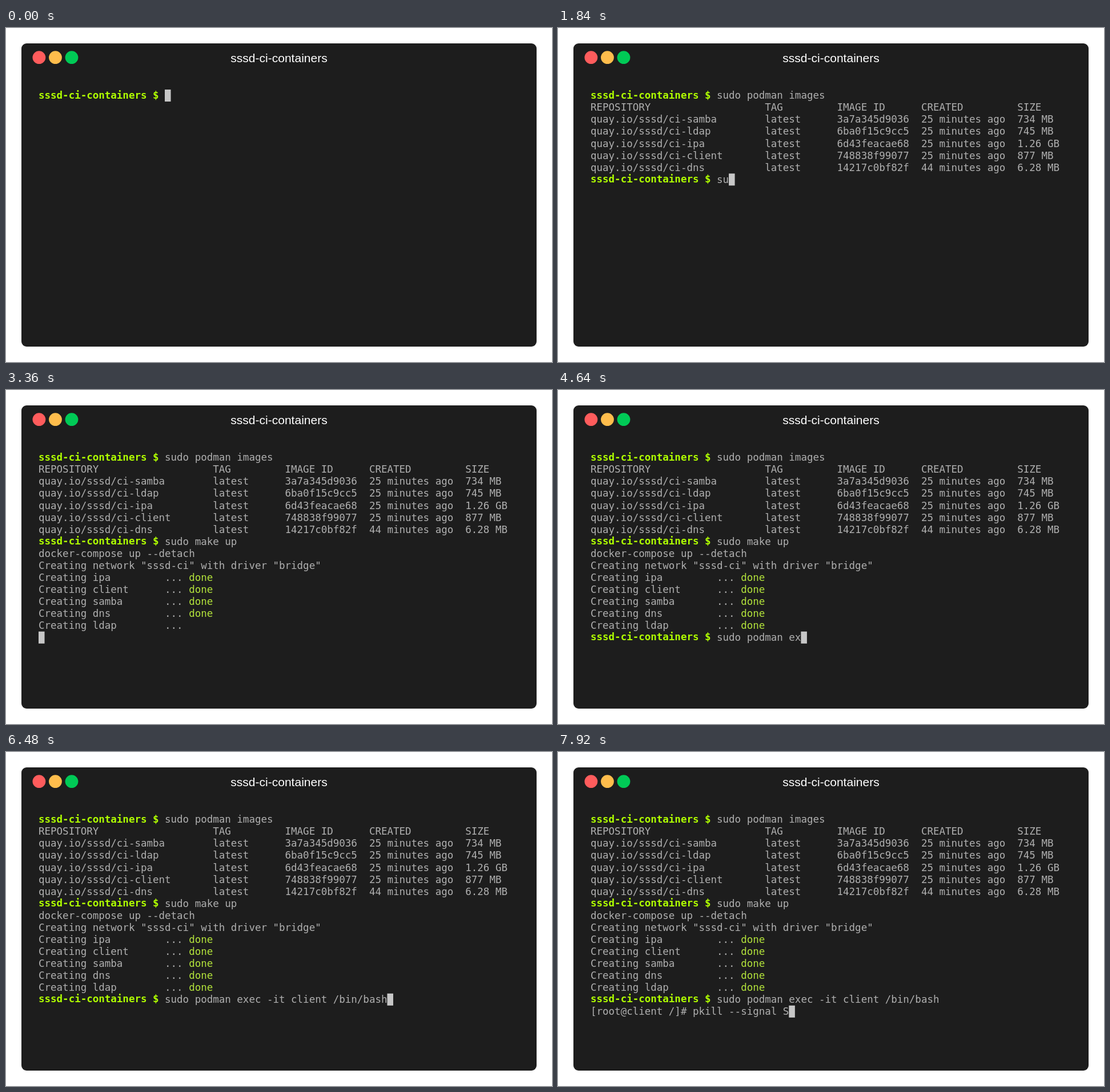
These frames come from a looping animation (956 px wide and 586 px high, 8 s). An HTML page with a canvas:

```html
<!DOCTYPE html>
<html lang="en">
<head>
<meta charset="utf-8">
<title>sssd-ci-containers</title>
<style>
  html, body { margin: 0; width: 100%; height: 100%; overflow: hidden; background: #fff; }
  canvas { display: block; width: 956px; height: 586px; }
</style>
</head>
<body>
<canvas id="stage"></canvas>
<script>
const W = 956, H = 586, LOOP = 8000, TICK = 80;
const CELL_W = 10.525, CELL_H = 21.05, LEFT = 57, TOP = 108;
const MONO = '17.54px "DejaVu Sans Mono", monospace';
const STYLES = {
  plain: { font: MONO, color: '#afafaf', base: 16.3 },
  done: { font: MONO, color: '#b3e33b', base: 16.3 },
  prompt: { font: 'bold ' + MONO, color: '#afff00', base: 15.5 }
};

const canvas = document.getElementById('stage');
const ctx = canvas.getContext('2d');
const dpr = window.devicePixelRatio || 1;
canvas.width = W * dpr;
canvas.height = H * dpr;
ctx.scale(dpr, dpr);

// Timeline entries: text appears at a tick, either at once or typed.
const events = [];
const put = (tick, row, col, text, style = 'plain') =>
  events.push({ tick, row, col, text, style });
const type = (tick, row, col, text) =>
  events.push({ tick, row, col, text, style: 'plain', typed: true });
const moveTo = (tick, row) => put(tick, row, 0, '');
const line = (tick, row, text) => { put(tick, row, 0, text); moveTo(tick, row + 1); };
const prompt = (tick, row) => {
  put(tick, row, 0, 'sssd-ci-containers $', 'prompt');
  put(tick, row, 20, ' ');
};
const tableRow = (repo, tag, id, created, size) =>
  repo.padEnd(29) + tag.padEnd(12) + id.padEnd(14) + created.padEnd(16) + size;

prompt(0, 0);
type(1, 0, 21, 'sudo podman images');
moveTo(19, 1);
[
  ['REPOSITORY', 'TAG', 'IMAGE ID', 'CREATED', 'SIZE'],
  ['quay.io/sssd/ci-samba', 'latest', '3a7a345d9036', '25 minutes ago', '734 MB'],
  ['quay.io/sssd/ci-ldap', 'latest', '6ba0f15c9cc5', '25 minutes ago', '745 MB'],
  ['quay.io/sssd/ci-ipa', 'latest', '6d43feacae68', '25 minutes ago', '1.26 GB'],
  ['quay.io/sssd/ci-client', 'latest', '748838f99077', '25 minutes ago', '877 MB'],
  ['quay.io/sssd/ci-dns', 'latest', '14217c0bf82f', '44 minutes ago', '6.28 MB']
].forEach((cells, i) => line(20, 1 + i, tableRow(...cells)));

prompt(21, 7);
type(22, 7, 21, 'sudo make up');
moveTo(34, 8);
line(35, 8, 'docker-compose up --detach');
line(36, 9, 'Creating network "sssd-ci" with driver "bridge"');
const services = ['ipa', 'client', 'samba', 'dns', 'ldap'];
services.forEach((name, i) =>
  line(i ? 38 : 37, 10 + i, ('Creating ' + name).padEnd(21) + '...'));
services.forEach((_, i) => {
  put(39 + i, 10 + i, 25, 'done', 'done');
  moveTo(39 + i, 15);
});

prompt(44, 15);
type(45, 15, 21, 'sudo podman exec -it client /bin/bash');
moveTo(82, 16);
put(83, 16, 0, '[root@client /]# ');
type(84, 16, 17, 'pkill --signal S');

function drawText(text, row, col, style) {
  const { font, color, base } = STYLES[style];
  ctx.font = font;
  ctx.fillStyle = color;
  ctx.textAlign = 'left';
  [...text].forEach((ch, i) => {
    if (ch !== ' ') ctx.fillText(ch, LEFT + (col + i) * CELL_W, TOP + row * CELL_H + base);
  });
}

function drawWindow() {
  ctx.fillStyle = '#fff';
  ctx.fillRect(0, 0, W, H);
  ctx.fillStyle = '#1d1d1d';
  ctx.beginPath();
  ctx.roundRect(27, 27, 902, 532, 9);
  ctx.fill();
  ['#ff5c5c', '#ffbd4c', '#00ca56'].forEach((color, i) => {
    ctx.fillStyle = color;
    ctx.beginPath();
    ctx.arc(57.9 + i * 28.55, 51.7, 11.4, 0, Math.PI * 2);
    ctx.fill();
  });
  ctx.font = '21.04px "Liberation Sans", Arial, sans-serif';
  ctx.fillStyle = '#fff';
  ctx.textAlign = 'center';
  ctx.fillText('sssd-ci-containers', 478, 59.5);
}

function render(ms) {
  const tick = Math.floor((ms % LOOP) / TICK + 1e-6);
  let row = 0, col = 0;
  drawWindow();
  for (const e of events) {
    if (e.tick > tick) break;
    const text = e.typed ? e.text.slice(0, tick - e.tick + 1) : e.text;
    drawText(text, e.row, e.col, e.style);
    row = e.row;
    col = e.col + text.length;
  }
  ctx.fillStyle = '#c7c7c7';
  ctx.fillRect(LEFT + col * CELL_W, TOP + row * CELL_H, CELL_W, CELL_H);
}

const start = performance.now();
function loop() {
  render(performance.now() - start);
  requestAnimationFrame(loop);
}
loop();
</script>
</body>
</html>
```
